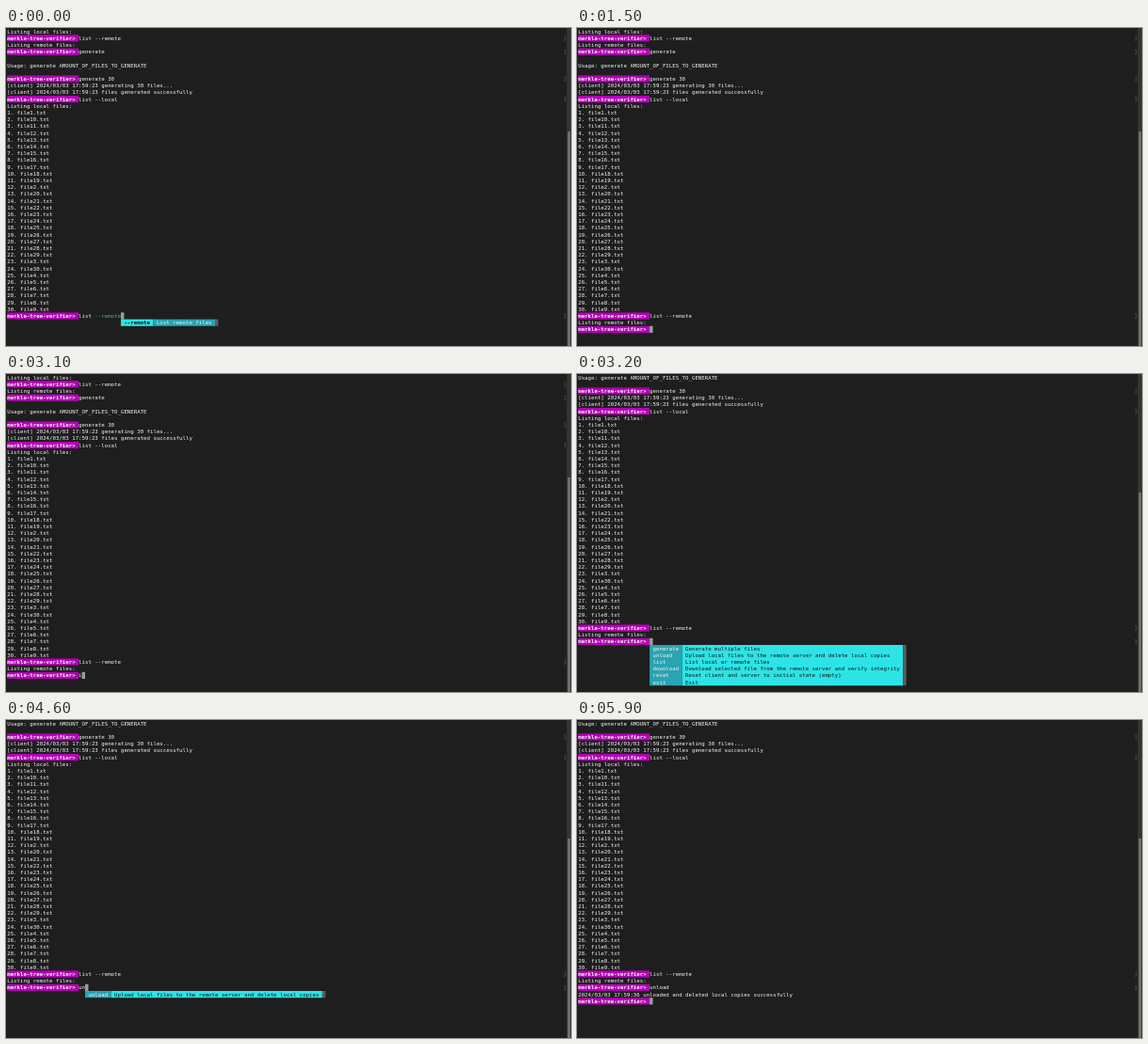
An HTML page with a canvas for the animation above (8000 ms loop, 600 by 338 pixels).

```html
<!DOCTYPE html>
<html lang="en">
<head>
<meta charset="utf-8">
<title>Terminal session</title>
<style>
html, body { margin: 0; width: 100%; height: 100%; overflow: hidden; background: #1e1e1f; }
canvas { display: block; width: 600px; height: 338px; }
</style>
</head>
<body>
<canvas id="stage" width="600" height="338"></canvas>
<script>
const ctx = document.getElementById("stage").getContext("2d");
const LOOP = 8000;
const W = 600, H = 338;
const CELL = 3.45, ROW = 7.2, LEFT = 1.2;
const FONT_SIZE = CELL / 0.602;
const ZOOM = 10; // glyphs are set large and scaled down for fractional positions
const PROMPT = "merkle-tree-verifier> ";
const INPUT = PROMPT.length;

const COLOR = {
  back: "#1e1e1f", text: "#f4f4f4", prompt: "#b400b6", cursor: "#9b9b9b",
  teal: "#2aa3b2", cyan: "#2ce4e6", preview: "#30b5b0", black: "#101416",
  bar: "#5c5c5c", mark: "#5a5a5a", track: "#343435", thumb: "#767677"
};

const COMMANDS = [
  ["generate", "Generate multiple files"],
  ["unload", "Upload local files to the remote server and delete local copies"],
  ["list", "List local or remote files"],
  ["download", "Download selected file from the remote server and verify integrity"],
  ["reset", "Reset client and server to initial state (empty)"],
  ["exit", "Exit"]
];

const files = Array.from({ length: 30 }, (_, i) => `file${i + 1}.txt`).sort();

// Lines starting with ">" are entered commands.
const history = [
  "Listing local files:",
  ">list --remote",
  "Listing remote files:",
  ">generate",
  "",
  "Usage: generate AMOUNT_OF_FILES_TO_GENERATE",
  "",
  ">generate 30",
  "[client] 2024/03/03 17:59:23 generating 30 files...",
  "[client] 2024/03/03 17:59:23 files generated successfully",
  ">list --local",
  "Listing local files:",
  ...files.map((name, i) => `${i + 1}. ${name}`)
];
const listed = [...history, ">list --remote", "Listing remote files:"];
const unloading = [...listed, ">unload"];
const unloaded = [...unloading, "2024/03/03 17:59:36 unloaded and deleted local copies successfully"];

// Each step holds until the next one starts.
const steps = [
  { at: 0, lines: history, typed: "list ", preview: "--remote" },
  { at: 500, lines: listed, typed: "" },
  { at: 2500, lines: listed, typed: "in" },
  { at: 2700, lines: listed, typed: "inl" },
  { at: 3000, lines: listed, typed: "in" },
  { at: 3100, lines: listed, typed: "i" },
  { at: 3200, lines: listed, typed: "", scroll: 5, menu: true },
  { at: 3400, lines: listed, typed: "u", scroll: 5, menu: true },
  { at: 3500, lines: listed, typed: "up", scroll: 5 },
  { at: 3900, lines: listed, typed: "u", scroll: 5, menu: true },
  { at: 4000, lines: listed, typed: "un", scroll: 5, menu: true },
  { at: 5800, lines: unloading, typed: null, scroll: 5 },
  { at: 5900, lines: unloaded, typed: "", scroll: 5 }
];

const colX = col => LEFT + col * CELL;

function rect(x, y, w, h, color) {
  ctx.fillStyle = color;
  ctx.fillRect(x, y, w, h);
}

function cells(col, row, count, color) {
  rect(colX(col), row * ROW, count * CELL, ROW, color);
}

function write(text, col, row, color = COLOR.text, bold = false) {
  ctx.save();
  ctx.scale(1 / ZOOM, 1 / ZOOM);
  ctx.font = `${bold ? "bold " : ""}${FONT_SIZE * ZOOM}px "DejaVu Sans Mono", monospace`;
  ctx.textBaseline = "alphabetic";
  ctx.fillStyle = color;
  [...text].forEach((ch, i) => {
    if (ch !== " ") ctx.fillText(ch, colX(col + i) * ZOOM, (row * ROW + 5.6) * ZOOM);
  });
  ctx.restore();
}

function drawPrompt(row) {
  cells(0, row, INPUT, COLOR.prompt);
  write(PROMPT, 0, row, COLOR.text, true);
}

function drawMark(row) {
  const y = row * ROW + 1.2;
  rect(593.6, y, 0.7, 5, COLOR.mark);
  rect(592.6, y, 1.2, 0.6, COLOR.mark);
  rect(592.6, y + 4.4, 1.2, 0.6, COLOR.mark);
}

function drawMenu(items, col, row, selected) {
  const widest = k => Math.max(...items.map(item => item[k].length)) + 2;
  const nameW = widest(0), noteW = widest(1);
  const [nameBack, noteBack] = selected ? [COLOR.cyan, COLOR.teal] : [COLOR.teal, COLOR.cyan];
  const [nameInk, noteInk] = selected ? [COLOR.black, COLOR.text] : [COLOR.text, COLOR.black];
  const x = colX(col), y = row * ROW, h = items.length * ROW;
  rect(x, y, nameW * CELL, h, nameBack);
  rect(x + nameW * CELL, y, noteW * CELL, h, noteBack);
  rect(x + (nameW + noteW) * CELL, y, CELL, h, COLOR.bar);
  items.forEach(([name, note], i) => {
    write(name, col + 1, row + i, nameInk, selected);
    write(note, col + nameW + 1, row + i, noteInk);
  });
}

function drawScrollbar(scroll) {
  const top = 110 + scroll * 3.2;
  rect(595.5, 0, 4.5, H, COLOR.track);
  rect(596.5, top, 2.6, H - top, COLOR.thumb);
}

function draw(time) {
  const step = steps.filter(s => s.at <= time).pop();
  const { lines, typed, preview = "", scroll = 0, menu } = step;
  rect(0, 0, W, H, COLOR.back);

  lines.slice(scroll).forEach((line, row) => {
    if (line[0] === ">") {
      drawPrompt(row);
      write(line.slice(1), INPUT, row);
      drawMark(row);
    } else {
      write(line, 0, row);
    }
  });

  const row = lines.length - scroll;
  if (typed === null) {
    cells(0, row, 1, COLOR.cursor);
  } else {
    const end = INPUT + typed.length + preview.length;
    drawPrompt(row);
    write(typed, INPUT, row);
    write(preview, INPUT + typed.length, row, COLOR.preview);
    cells(end, row, 1, COLOR.cursor);
    if (preview) {
      drawMark(row);
      drawMenu([[preview, "List remote files"]], end, row + 1, true);
    } else if (menu) {
      drawMark(row);
      drawMenu(COMMANDS.filter(([name]) => name.startsWith(typed)), end, row + 1, false);
    }
  }
  drawScrollbar(scroll);
}

const start = performance.now();
function tick() {
  draw((performance.now() - start) % LOOP);
  requestAnimationFrame(tick);
}
tick();
</script>
</body>
</html>
```
